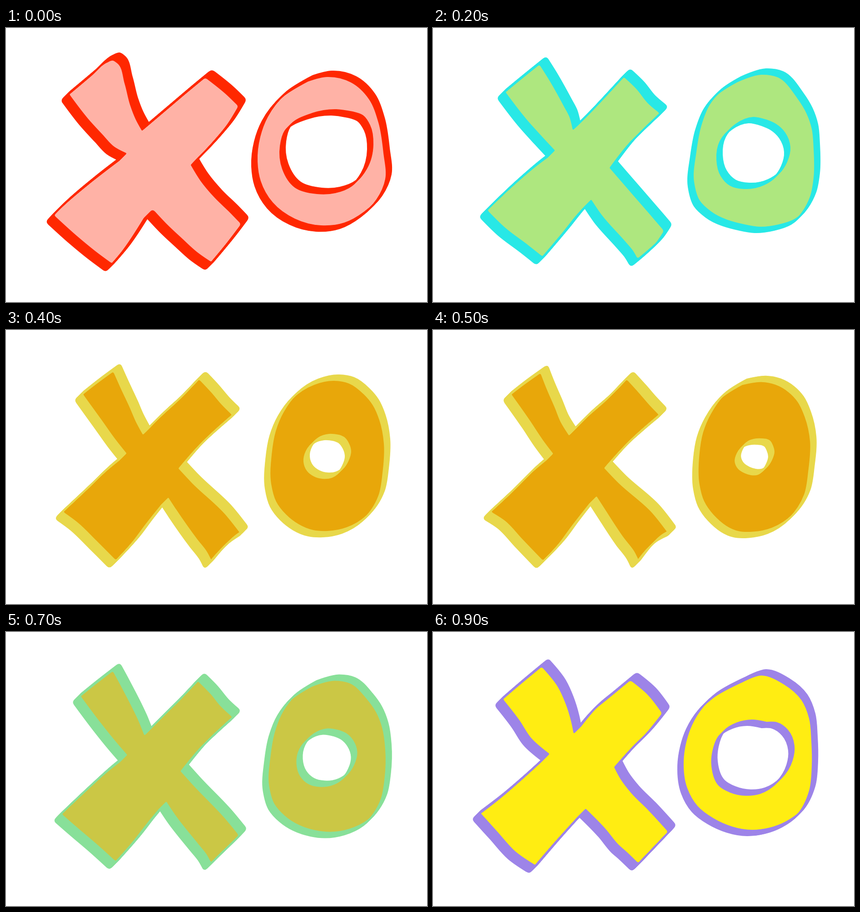
Animation of 927 by 604 pixels, one loop 1000 ms. Source, as an HTML page with a canvas:

```html
<!DOCTYPE html>
<html lang="en">
<head>
<meta charset="utf-8">
<title>XO</title>
<style>
  html, body { margin: 0; width: 100%; height: 100%; overflow: hidden; background: #fff; }
  canvas { display: block; }
</style>
</head>
<body>
<canvas width="927" height="604"></canvas>
<script>
// Each letter is a smooth pen path; "!" marks a sharp corner, "~" a rounded one.
const parse = text => text.trim().split(/\s+/).map(s => {
  const [x, y] = s.split(',').map(parseFloat);
  return { x, y, sharp: /[!~]/.test(s), round: s.endsWith('~') };
});
const pose = (line, fill, ...shapes) => ({ line, fill, shapes: shapes.map(parse) });

const red = pose('#ff2800', '#ffb2a6',
  `129,152~ 192,99 228,68 243,63 254,70 270,115 282,162 294,193 307,217! 360,172 400,138 446,100~
   492,137 521,165~ 495,207 460,249 416,295! 437,329 468,366 502,399 527,425~ 495,467 446,526~
   412,502 380,473 349,444 315,408~ 262,488 227,529~ 188,500 148,467 96,420~ 130,386 190,335
   256,284! 230,270 204,243 172,208`,
  `670,111! 712,101 765,113 806,151 827,203 838,270 842,328 822,374 785,411 740,436 688,442 630,427
   581,391 554,343 547,300 553,245 570,200 612,147`,
  `758,191! 780,199 795,220 802,262 788,315 766,342 730,357 690,359 642,345 615,305 610,255 620,222
   670,194 722,186`);

const yellow = pose('#9d84e8', '#ffed12',
  `144,154~ 188,116 247,67~ 284,114 301,151 313,190 318,214! 362,163 390,140 442,97~ 482,131 514,172~
   475,220 440,255 408,291! 422,317 445,347 482,384 527,433~ 445,519~ 418,493 400,477 373,444 329,399!
   280,453 219,524~ 173,492 133,448 94,405~ 150,362 200,319 247,276! 207,241 182,203`,
  `684,105! 728,89 779,109 818,144 835,185 840,235 841,290 835,345 807,399 773,424 697,443 611,417
   576,390 553,350 545,290 551,247 564,209 590,168 620,140`,
  `729,205! 752,206 775,222 789,256 785,288 762,326 725,350 694,354 660,347 636,333 620,290 622,258
   636,224 665,206 697,200`);

const green = pose('#28e8e6', '#aee77f',
  `149,147~ 195,109 242,71~ 267,111 297,165 309,188 316,215! 350,181 380,149 427,98~ 457,127 481,157
   509,181~ 475,213 437,251 398,301! 423,330 488,405 518,440~ 498,469 475,491 443,518~ 431,498 415,479
   362,419 341,388! 323,408 295,443 235,514~ 201,487 151,449 110,409~ 180,342 235,295 259,277! 232,248
   197,209`,
  `674,113! 728,96 765,102 809,149 829,182 841,217 845,260 845,325 837,367 793,427 756,440 713,445
   681,440 606,411 581,387 568,345 573,278 584,220 603,173 628,143`,
  `729,209! 749,218 769,237 780,268 773,300 757,324 733,340 691,348 660,341 640,320 631,285 638,245
   662,218 700,203`);

const orange = pose('#e8d84b', '#e8a70a',
  `159,147~ 198,116 244,82~ 261,120 282,165 294,193 309,221! 347,183 382,151 432,99~ 461,130 483,156
   508,181~ 472,212 433,248 389,298! 417,328 490,397 526,442~ 497,462 475,483 445,518~ 434,497 413,470
   367,405 350,379! 315,423 288,459 235,517~ 191,473 151,434 116,408~ 180,348 228,302 256,279! 233,250
   203,208`,
  `683,114 728,105 761,111 794,135 814,159 829,193 839,245 836,310 827,360 790,415 745,442 703,450
   671,448 610,413 588,384 577,345 578,280 587,228 605,185 635,145`,
  `728,238! 739,243 748,255 753,272 747,294 737,309 722,319 702,321 684,316 669,304 662,285 667,262
   684,243 706,236`);

const mix = (a, b, k, line, fill) => ({
  line, fill,
  shapes: a.shapes.map((pts, s) => pts.map((p, i) => {
    const q = b.shapes[s][i];
    return { ...p, x: p.x + (q.x - p.x) * k, y: p.y + (q.y - p.y) * k };
  }))
});
const poses = [
  red, yellow, green,
  mix(green, orange, 0.5, '#88e099', '#cbc745'),
  orange,
  mix(green, orange, 1.3, orange.line, orange.fill)
];

const gap = (p, q) => Math.hypot(q.x - p.x, q.y - p.y);
const toward = (p, q, r) => {
  const k = r / gap(p, q);
  return { x: p.x + (q.x - p.x) * k, y: p.y + (q.y - p.y) * k };
};

function smooth(pts) {
  const n = pts.length;
  const nodes = pts.map((p, i) => {
    const a = pts[(i + n - 1) % n], b = pts[(i + 1) % n];
    if (p.round) return { tip: p, in: toward(p, a, 7), out: toward(p, b, 7), ux: 0, uy: 0 };
    const l = gap(a, p), m = gap(p, b);
    const slope = k => p.sharp ? 0 : ((p[k] - a[k]) * m / l + (b[k] - p[k]) * l / m) / (l + m);
    return { in: p, out: p, ux: slope('x'), uy: slope('y') };
  });
  const path = new Path2D();
  path.moveTo(nodes[0].out.x, nodes[0].out.y);
  nodes.forEach((a, i) => {
    const b = nodes[(i + 1) % n], p = a.out, q = b.in, h = gap(p, q) / 3;
    path.bezierCurveTo(p.x + a.ux * h, p.y + a.uy * h, q.x - b.ux * h, q.y - b.uy * h, q.x, q.y);
    if (b.tip) path.quadraticCurveTo(b.tip.x, b.tip.y, b.out.x, b.out.y);
  });
  path.closePath();
  return path;
}

const ctx = document.querySelector('canvas').getContext('2d');

// A slanted flat nib makes the line thick on two sides and thin on the others.
function ink(path, nib) {
  for (let k = -1; k <= 1; k += 0.125) {
    ctx.save();
    ctx.translate(k * nib, -k * nib);
    ctx.stroke(path);
    ctx.restore();
  }
}

function paint({ line, fill, shapes }) {
  const [x, o, hole] = shapes.map(smooth);
  const ring = new Path2D(o);
  ring.addPath(hole);
  ctx.fillStyle = '#fff';
  ctx.fillRect(0, 0, 927, 604);
  ctx.fillStyle = fill;
  ctx.strokeStyle = line;
  ctx.lineWidth = 3.4;
  ctx.lineJoin = 'round';
  ctx.fill(x);
  ctx.fill(ring, 'evenodd');
  ink(x, 7.2);
  ink(o, 5.3);
  ink(hole, 5.3);
}

// The poses run forward and then back, 100 ms each.
let shown = -1;
function draw(now) {
  const step = Math.floor(now / 100) % 10;
  const next = step < 6 ? step : 10 - step;
  if (next !== shown) paint(poses[shown = next]);
  requestAnimationFrame(draw);
}
draw(performance.now());
</script>
</body>
</html>
```
